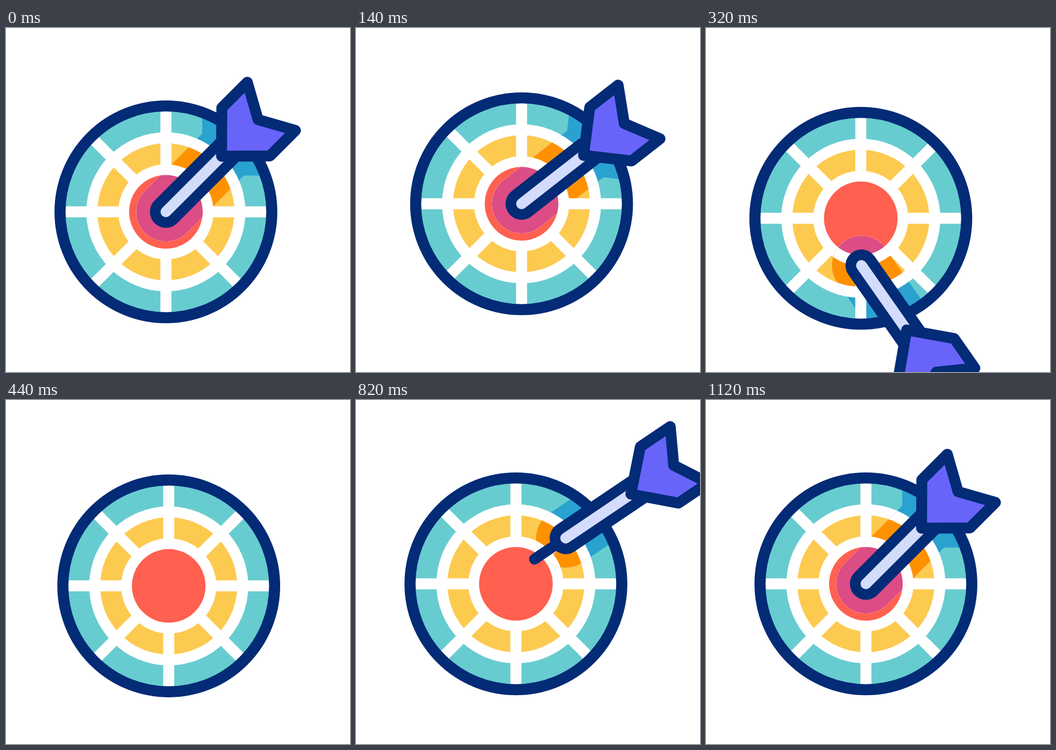
Recreate the animation shown at these times as an HTML page with a canvas. Size 640 px wide and 640 px high, loop 1820 ms.

```html
<!DOCTYPE html>
<html lang="en">
<head>
<meta charset="utf-8">
<title>Dartboard</title>
<style>
  html, body { margin: 0; width: 100%; height: 100%; overflow: hidden; background: #fff; }
  canvas { display: block; width: 640px; height: 640px; }
</style>
</head>
<body>
<canvas id="stage" width="640" height="640"></canvas>
<script>
const ctx = document.getElementById('stage').getContext('2d');
const LOOP = 1820, HIT = 870, REST = 1120;
const HOME = { x: 297.5, y: 342 };
const NAVY = '#032b76';
const LIT = ['#67ccd0', '#fdca50', '#ff6050'];
const SHADED = ['#2aa2cf', '#ff9100', '#dc4c85'];
const HEAD = [[146.4, 0], [210.4, -63.3], [277.5, -63.3], [242.5, 0], [277.5, 63.3], [210.4, 63.3]];
const NEEDLE = 70;

// time, x and y offset of the shaken board
const SHAKE = [
  [0, 0, 0], [10, 0, 0], [60, 5, -7], [110, 10.5, -14.3], [140, 10.5, -15],
  [220, -16, -8], [320, -9.5, 12], [420, 5, 5], [520, 0, 0]
];
// time, angle of the dart while it comes loose
const TURN = [[0, 45], [95, 45], [140, 38], [220, 1.3], [320, -55], [420, -100]];
// time, x, y, angle of the incoming dart
const FLIGHT = [
  [640, 752, 104, 20.5], [660, 711, 119, 22], [730, 571, 168, 26.5],
  [800, 428, 234, 31.7], [820, 390, 257, 34], [HIT, HOME.x, HOME.y, 45]
];

// Smooth curve through timed rows; returns the values without the time
function along(rows, t) {
  const last = rows.length - 1;
  if (t <= rows[0][0]) return rows[0].slice(1);
  if (t >= rows[last][0]) return rows[last].slice(1);
  let i = 0;
  while (t >= rows[i + 1][0]) i++;
  const a = rows[i], b = rows[i + 1], d = b[0] - a[0], s = (t - a[0]) / d;
  const slope = (n, k) => {
    const p = rows[Math.max(0, n - 1)], q = rows[Math.min(last, n + 1)];
    return (q[k] - p[k]) / (q[0] - p[0]);
  };
  const h = s * s * (3 - 2 * s);
  return a.slice(1).map((v, j) => {
    const k = j + 1;
    return v + (b[k] - v) * h
      + d * s * (1 - s) * ((1 - s) * slope(i, k) - s * slope(i + 1, k));
  });
}

function dartAt(t, board) {
  if (t < 520) {
    const fall = 0.0058 * Math.max(0, t - 197) ** 2;
    const slip = Math.min(1, Math.max(0, (t - 197) / 23));
    return { x: board.x + 1.2 * slip, y: board.y + fall, angle: along(TURN, t)[0], needle: 0 };
  }
  if (t < 640) return null;
  let [x, y, angle] = along(FLIGHT, t);
  if (t > HIT && t < REST) {
    const s = t - HIT;
    angle += 7 * Math.sin(s * Math.PI * 2 / 125) * Math.exp(-s / 80);
  }
  const gap = Math.hypot(x - HOME.x, y - HOME.y);
  return { x, y, angle, needle: Math.min(NEEDLE, gap) };
}

function place(p) {
  ctx.translate(p.x, p.y);
  if (p.angle) ctx.rotate(-p.angle * Math.PI / 180);
}

function disc(r, color) {
  ctx.fillStyle = color;
  ctx.beginPath();
  ctx.arc(0, 0, r, 0, Math.PI * 2);
  ctx.fill();
}

function line(x1, x2, width, color, cap) {
  ctx.strokeStyle = color;
  ctx.lineWidth = width;
  ctx.lineCap = cap;
  ctx.beginPath();
  ctx.moveTo(x1, 0);
  ctx.lineTo(x2, 0);
  ctx.stroke();
}

function polygon(points) {
  points.forEach(([x, y], i) => i ? ctx.lineTo(x, y) : ctx.moveTo(x, y));
  ctx.closePath();
}

function rings([outer, middle, inner], board) {
  ctx.save();
  place(board);
  disc(190, outer);
  disc(148, '#fff');
  disc(127.5, middle);
  disc(88.5, '#fff');
  disc(68.5, inner);
  ctx.restore();
}

function clipShadow(dart) {
  ctx.save();
  place(dart);
  ctx.beginPath();
  ctx.moveTo(250, -55);
  ctx.lineTo(0, -55);
  ctx.arc(0, 0, 55, -Math.PI / 2, Math.PI / 2, true);
  ctx.lineTo(250, 55);
  ctx.closePath();
  polygon([[95.5, 0], [194.8, 99.3], [320, 99.3], [320, -99.3], [194.8, -99.3]]);
  ctx.restore();
  ctx.clip();
}

function drawFrame(board) {
  ctx.save();
  place(board);
  for (let i = 0; i < 8; i++) {
    line(78, 190, 20.5, '#fff', 'butt');
    ctx.rotate(Math.PI / 4);
  }
  ctx.strokeStyle = NAVY;
  ctx.lineWidth = 20.6;
  ctx.beginPath();
  ctx.arc(0, 0, 197, 0, Math.PI * 2);
  ctx.stroke();
  ctx.restore();
}

function drawDart(dart) {
  ctx.save();
  place(dart);
  if (dart.needle > 0) line(-dart.needle, 0, 20, NAVY, 'round');
  line(0, 172, 59.5, NAVY, 'round');
  line(0, 150, 20, '#d3dcfc', 'round');
  ctx.beginPath();
  polygon(HEAD);
  ctx.fillStyle = '#6864fa';
  ctx.fill();
  ctx.strokeStyle = NAVY;
  ctx.lineWidth = 20.3;
  ctx.lineJoin = 'round';
  ctx.stroke();
  ctx.restore();
}

function draw(t) {
  const [dx, dy] = along(SHAKE, t);
  const board = { x: HOME.x + dx, y: HOME.y + dy };
  const dart = dartAt(t, board);
  ctx.fillStyle = '#fff';
  ctx.fillRect(0, 0, 640, 640);
  rings(LIT, board);
  if (dart) {
    ctx.save();
    clipShadow(dart);
    rings(SHADED, board);
    ctx.restore();
  }
  drawFrame(board);
  if (dart) drawDart(dart);
}

let start;
function tick(now) {
  start ??= now;
  draw((now - start) % LOOP);
  requestAnimationFrame(tick);
}
draw(0);
requestAnimationFrame(tick);
</script>
</body>
</html>
```
